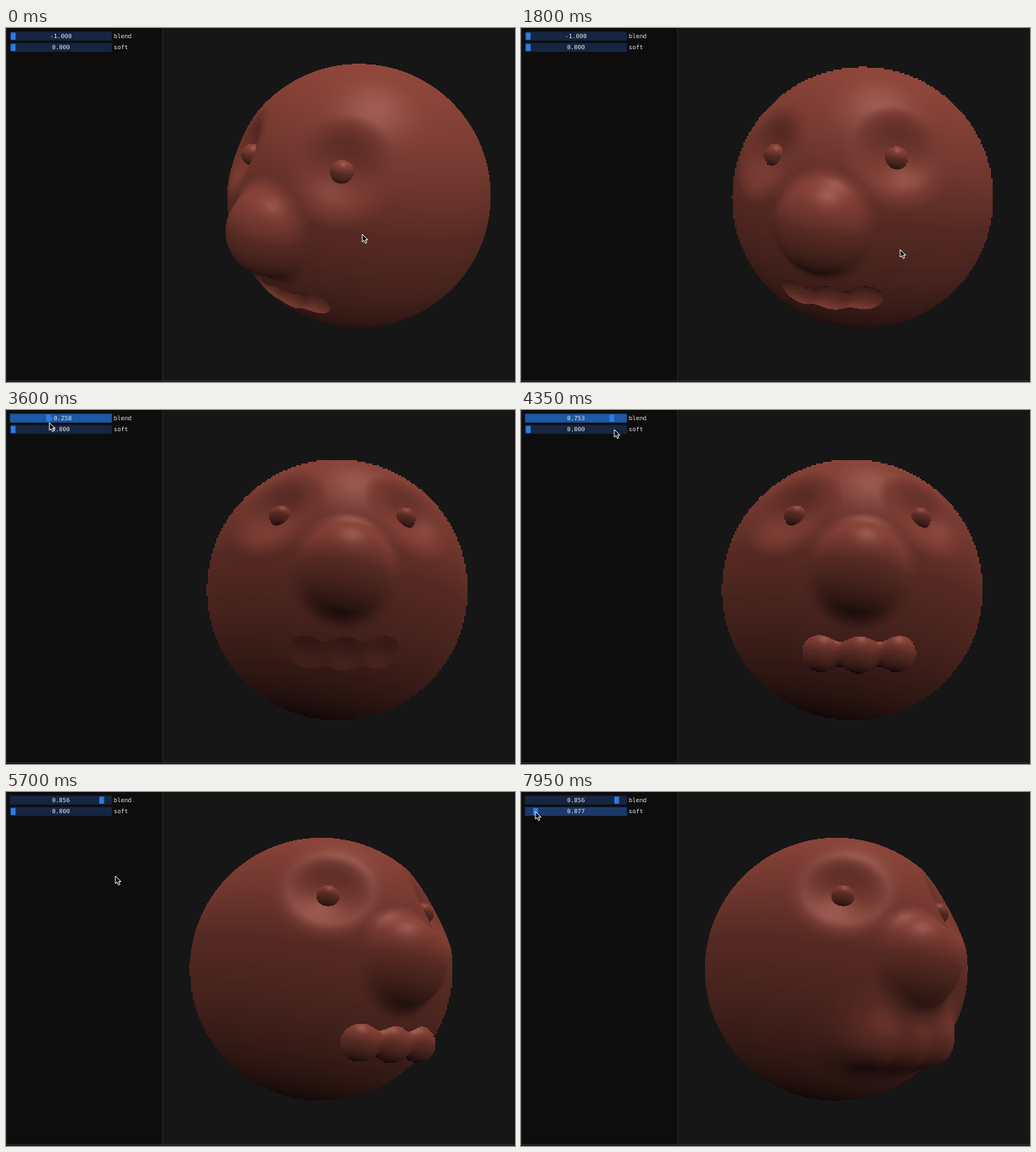
An HTML page with a canvas that plays this animation: 600x417 px, repeating every 8 s.

```html
<!DOCTYPE html>
<html lang="en">
<head>
<meta charset="utf-8">
<title>Blended head</title>
<style>
  html, body { margin: 0; width: 100%; height: 100%; overflow: hidden; background: #161616; }
  canvas { display: block; }
</style>
</head>
<body>
<canvas id="stage" width="600" height="417"></canvas>
<script>
const ctx = document.getElementById('stage').getContext('2d');
const LOOP = 8000, STEP = 50;

// Camera, and the square of the viewport that can contain the model
const PIVOT = { x: 392.6, y: 204.5 }, DISTANCE = 5.3, FOCAL = 833;
const VIEW = { x: 204, y: 15, size: 378 }, COARSE = 2;

// Piecewise linear track of [time, value] keys
function track(...keys) {
  return t => {
    const i = keys.findIndex(key => key[0] > t);
    if (i < 0) return keys[keys.length - 1][1];
    if (i === 0) return keys[0][1];
    const [t0, a] = keys[i - 1], [t1, b] = keys[i];
    return a + (b - a) * (t - t0) / (t1 - t0);
  };
}

const yawAt = track([700, -41.3], [1800, -17], [2150, 3.4], [4950, 3.4], [5400, 36.3]);
const pitchAt = track([700, -15], [1800, -8], [2150, 12], [4950, 12], [5400, 8.5]);
const blendAt = track([3050, -1], [4350, 0.753], [4550, 0.856]);
const softAt = track([6200, 0], [6750, 0.155], [7100, 0.19], [7700, 0.077]);
const cursorX = track([700, 420], [1800, 447], [2150, 468], [2400, 160], [2800, 8], [3050, 8],
  [4350, 110], [4550, 115], [4950, 390], [5400, 426], [5550, 129], [5700, 129],
  [6150, 11], [6200, 11], [6750, 27], [7100, 32], [7700, 17]);
const cursorY = track([700, 243], [1800, 261], [2150, 305], [2400, 104], [2800, 9], [3050, 9],
  [4350, 23], [4550, 23], [4950, 230], [5400, 224], [5550, 99], [5700, 99],
  [6150, 24], [7700, 23]);

const within = (t, a, b) => t >= a && t < b;

// Rows above this line are traced at full resolution
function refinedRows(t) {
  if (within(t, 700, 2250) || within(t, 3050, 5500) || within(t, 6200, 7800)) return 0;
  return within(t, 5500, 5800) ? 200 : 417;
}

let blend = -1, soft = 0;

function smin(a, b, k) {
  const h = k - Math.abs(a - b);
  return h > 0 ? Math.min(a, b) - h * h / (4 * k) : Math.min(a, b);
}
const smax = (a, b, k) => -smin(-a, -b, k);
const ball = (x, y, z, r) => Math.sqrt(x * x + y * y + z * z) - r;

function distanceTo(x, y, z) {
  const side = Math.abs(x);
  let body = ball(x, y, z + 0.225, 1);
  body = smax(body, -ball(side - 0.558, y - 0.476, z - 0.66, 0.25), 0.2);
  body = smin(body, ball(x, y + 0.066, z - 0.7, 0.305), 0.09);

  const mouth = smin(ball(x, y + 0.612, z - 0.605, 0.133),
                     ball(side - 0.258, y + 0.606, z - 0.585, 0.133), 0.11);
  const mixed = blend > 0 ? smin(body, mouth, 4 * soft) : smax(body, -mouth, 4 * soft);
  body += Math.abs(blend) * (mixed - body);

  return Math.min(body, ball(side - 0.434, y - 0.37, z - 0.465, 0.076));
}

function renderHead(yaw, pitch, fineRows) {
  const size = VIEW.size, image = new ImageData(size, size), rgba = image.data;
  const cy = Math.cos(yaw), sy = Math.sin(yaw), cp = Math.cos(pitch), sp = Math.sin(pitch);
  const eye = { x: -DISTANCE * cp * sy, y: -DISTANCE * sp, z: DISTANCE * cp * cy };
  const lightLength = Math.hypot(0.18, 1);
  const light = { x: 0.18 * cy / lightLength, y: 1 / lightLength, z: 0.18 * sy / lightLength };
  let dx, dy, dz;

  function aim(px, py) {
    const u = VIEW.x + px - PIVOT.x, v = PIVOT.y - VIEW.y - py;
    const length = Math.hypot(u, v, FOCAL), depth = v * sp - FOCAL * cp;
    dx = (u * cy - depth * sy) / length;
    dy = (v * cp + FOCAL * sp) / length;
    dz = (u * sy + depth * cy) / length;
  }

  const along = s => distanceTo(eye.x + dx * s, eye.y + dy * s, eye.z + dz * s);

  function march() {
    let s = DISTANCE - 1.3;
    for (let i = 0; i < 120 && s < DISTANCE + 0.9; i++) {
      const d = along(s);
      if (d < 0.0015) return s;
      s += d;
    }
    return 0;
  }

  function shade(px, py, s) {
    const e = 0.002, x = eye.x + dx * s, y = eye.y + dy * s, z = eye.z + dz * s;
    const d = distanceTo(x, y, z);
    let nx = distanceTo(x + e, y, z) - d;
    let ny = distanceTo(x, y + e, z) - d;
    let nz = distanceTo(x, y, z + e) - d;
    const n = Math.hypot(nx, ny, nz) || 1;
    nx /= n; ny /= n; nz /= n;

    const lit = nx * light.x + ny * light.y + nz * light.z;
    const hx = light.x - dx, hy = light.y - dy, hz = light.z - dz;
    const facing = Math.max(0, (nx * hx + ny * hy + nz * hz) / Math.hypot(hx, hy, hz));
    const shine = 27 * facing ** 30 * Math.min(1, Math.max(0, lit * 4 + 0.4));
    const ambient = 0.088 * Math.min(1, 1.03 + lit), diffuse = 0.2 * Math.max(0, lit);
    const clay = 255 * (ambient + diffuse) ** (1 / 2.2);
    const at = (py * size + px) * 4;
    rgba[at] = clay + shine;
    rgba[at + 1] = clay * 0.49 + shine;
    rgba[at + 2] = clay * 0.41 + shine;
    rgba[at + 3] = 255;
  }

  for (let by = 0; by < size; by += COARSE) {
    const fine = by + VIEW.y < fineRows;
    for (let bx = 0; bx < size; bx += COARSE) {
      let start = 0;
      if (!fine) {
        aim(bx + COARSE / 2, by + COARSE / 2);
        start = march();
        if (!start) continue;
      }
      for (let py = by; py < by + COARSE; py++) {
        for (let px = bx; px < bx + COARSE; px++) {
          aim(px + 0.5, py + 0.5);
          let s = fine ? march() : start;
          if (!s) continue;
          if (!fine) for (let i = 0; i < 2; i++) s += along(s);
          shade(px, py, s);
        }
      }
    }
  }
  return image;
}

const layer = document.createElement('canvas');
layer.width = layer.height = VIEW.size;
let layerKey = '';

function drawHead(t) {
  const yaw = yawAt(t), pitch = pitchAt(t), fineRows = refinedRows(t);
  blend = blendAt(t);
  soft = softAt(t);
  const key = [yaw, pitch, blend, soft, fineRows].join();
  if (key !== layerKey) {
    const radians = Math.PI / 180;
    layer.getContext('2d').putImageData(renderHead(yaw * radians, pitch * radians, fineRows), 0, 0);
    layerKey = key;
  }
  ctx.drawImage(layer, VIEW.x, VIEW.y);
}

function rect(color, x, y, w, h) {
  ctx.fillStyle = color;
  ctx.fillRect(x, y, w, h);
}

function drawSlider(y, label, value, fraction, mode) {
  rect({ idle: '#162642', hover: '#1a3a69', active: '#1b59a5' }[mode], 4.6, y, 120.2, 10.4);
  rect('#2b7de6', 5.7 + fraction * 112.4, y + 1, 5.6, 8.4);
  ctx.font = '7px "DejaVu Sans Mono", monospace';
  ctx.fillStyle = '#e4e6ea';
  ctx.textAlign = 'center';
  ctx.fillText(value.toFixed(3), 64.7, y + 7.7);
  ctx.textAlign = 'left';
  ctx.fillText(label, 127, y + 7.7);
}

const cursorShape = new Path2D('M0 0V9L2 7.2L3.6 10.6L5.2 9.8L3.7 6.6H6.5Z');
function drawCursor(x, y) {
  ctx.fillStyle = '#000';
  ctx.strokeStyle = '#fff';
  ctx.lineWidth = 0.9;
  ctx.save();
  ctx.translate(x, y);
  ctx.fill(cursorShape);
  ctx.stroke(cursorShape);
  ctx.restore();
}

function draw(t) {
  rect('#161616', 0, 0, 600, 417);
  drawHead(t);

  rect('#0d0d0e', 0, 0, 184, 417);
  rect('#242425', 184, 0, 1, 416);
  rect('#242425', 0, 0, 1, 416);
  rect('#303031', 0, 415, 600, 1);

  const blendMode = within(t, 3050, 4600) ? 'active' : within(t, 2750, 3050) ? 'hover' : 'idle';
  const softMode = within(t, 6200, 7800) ? 'active' : t >= 6100 ? 'hover' : 'idle';
  drawSlider(4.4, 'blend', blend, (blend + 1) / 2, blendMode);
  drawSlider(17.7, 'soft', soft, soft, softMode);
  drawCursor(cursorX(t), cursorY(t));
}

let shown = -1;
function tick() {
  const t = Math.floor(performance.now() % LOOP / STEP) * STEP;
  if (t !== shown) draw(shown = t);
  requestAnimationFrame(tick);
}
tick();
</script>
</body>
</html>
```
